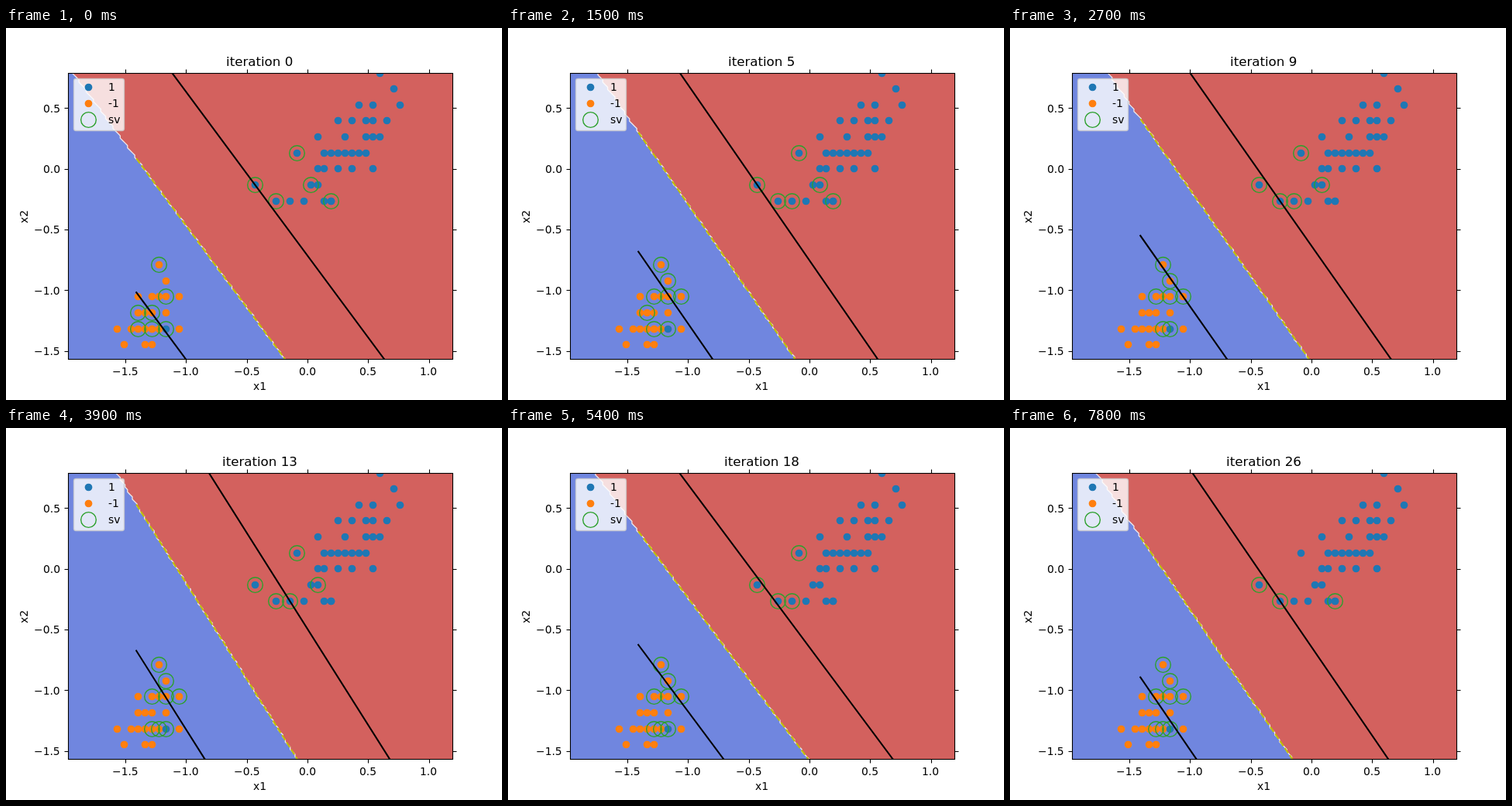
An HTML page with a canvas for the animation above (8 s loop, 640x480 px).

```html
<!DOCTYPE html>
<html lang="en">
<head>
<meta charset="utf-8">
<title>Decision boundary</title>
<style>
html, body { margin: 0; width: 100%; height: 100%; overflow: hidden; background: #fff; }
canvas { display: block; width: 640px; height: 480px; }
</style>
</head>
<body>
<canvas id="plot" width="640" height="480"></canvas>
<script>
const ctx = document.getElementById('plot').getContext('2d');
const STEP = 300, LOOP = 8000;
const L = 80, R = 576, T = 57.6, B = 427.2;
const UNIT = 156.65, CELL = UNIT * 0.02, LINE_X = 168.2;
const BLUE = '#1f77b4', ORANGE = '#ff7f0e', GREEN = '#2ca02c';

const px = v => 389.1 + v * UNIT;
const py = v => 181.7 - v * UNIT;
const snap = v => Math.round(v) + 0.5;

// Samples lie on a grid of columns and rows
const col = c => Math.floor(143.7 + 8.908 * c) + 0.5;
const row = r => Math.floor(58.05 + 20.63 * r) + 0.5;
const samples = [], vectors = [];

// Samples along one row; bend moves them towards one end
function spread(r, first, last = first, count = 1, bend = 1) {
  for (let i = 0; i < count; i++) {
    const u = count > 1 ? i / (count - 1) : 0;
    samples.push([Math.round(first + (last - first) * (1 - (1 - u) ** bend)), r]);
  }
}

// Samples that are support vectors from one iteration to another
function support(from, to, ...cells) {
  for (const cell of cells) {
    samples.push(cell);
    vectors.push({ cell, from, to });
  }
}

spread(0, 38);
spread(1, 40);
spread(2, 35, 41, 3, 0.6);
spread(3, 32, 39, 5);
spread(4, 29, 38, 5, 2);
spread(5, 30, 36, 7);
spread(6, 29, 37, 5, 0.6);
spread(8, 27, 30, 2);
spread(14, 3, 6, 2);
spread(15, 7);
spread(16, 0, 9, 4, 0.6);
spread(17, 1, 5, 3, 2);

const outlier = [7, 16];
support(0, 26, [20, 7], [23, 8], [6, 12], [7, 14], outlier);
support(0, 2, [28, 7], [3, 15], [5, 15], [3, 16]);
support(3, 26, [7, 13], [5, 14], [9, 14]);
support(0, 18, [26, 5]);
support(3, 14, [29, 7]);
support(3, 23, [25, 8]);
support(0, 6, [31, 8], [5, 16]);
support(3, 6, [4, 15]);
support(7, 26, [6, 16]);
support(11, 26, [5, 16]);
support(20, 26, [31, 8]);

// Iteration, boundary x at the bottom, its run to the top, half margin
const fits = [
  [0, 360, 274, 128], [5, 370.5, 255.5, 106.5], [9, 385.8, 259.5, 105.8],
  [13, 375.8, 233.5, 119.3], [16, 400.8, 285.5, 105.3],
  [22, 360.5, 256, 117], [26, 364.3, 253, 123.8]
];

function fitAt(n) {
  const i = Math.max(1, fits.findIndex(f => f[0] >= n));
  const a = fits[i - 1], b = fits[i];
  const u = (n - a[0]) / (b[0] - a[0]);
  return a.map((v, k) => v + (b[k] - v) * u);
}

function path(points, color, width) {
  ctx.beginPath();
  for (const [x, y] of points) ctx.lineTo(x, y);
  ctx.strokeStyle = color;
  ctx.lineWidth = width;
  ctx.stroke();
}

function dot(x, y, color) {
  ctx.beginPath();
  ctx.arc(x, y, 4.86, 0, 7);
  ctx.fillStyle = color;
  ctx.fill();
}

function ring(x, y) {
  ctx.beginPath();
  ctx.arc(x, y, 9.82, 0, 7);
  ctx.strokeStyle = GREEN;
  ctx.lineWidth = 1.39;
  ctx.stroke();
}

// Text starts on whole pixels; align is 0 for left, 0.5 for centre, 1 for right
function text(s, x, y, align = 0.5, size = 13.89) {
  ctx.font = `${size}px "DejaVu Sans", sans-serif`;
  ctx.fillStyle = '#000';
  ctx.fillText(s, Math.round(x - align * ctx.measureText(s).width), Math.round(y));
}

// Class regions on a coarse grid, which gives the boundary its steps
function regions(bottom, run) {
  const edge = [];
  for (let y = B; y > T - CELL; y -= CELL) {
    const x = bottom - run * (B - y) / (B - T);
    edge.push([L + (Math.floor((x - L) / CELL) + 0.5) * CELL, y]);
  }
  ctx.fillStyle = '#d3615e';
  ctx.fillRect(L, T, R - L, B - T);
  ctx.beginPath();
  ctx.moveTo(L, B);
  for (const [x, y] of edge) ctx.lineTo(x, y);
  ctx.lineTo(L, T - CELL);
  ctx.fillStyle = '#7086df';
  ctx.fill();
  path(edge, '#eee8ea', 1.3);
}

function model(n) {
  const [, mid, run, half] = fitAt(n);
  const from = x => [[LINE_X, B - (x - LINE_X) * (B - T) / run], [x, B]];

  regions(mid, run);
  for (const [c, r] of samples) dot(col(c), row(r), r < 9 ? BLUE : ORANGE);
  dot(col(outlier[0]), row(outlier[1]), BLUE);
  for (const { cell: [c, r], from, to } of vectors) {
    if (n >= from && n <= to) ring(col(c), row(r));
  }

  ctx.setLineDash([7.7, 3.3]);
  path(from(mid), '#bfbf00', 2.08);
  ctx.setLineDash([]);
  ctx.lineCap = 'square';
  path(from(mid + half), '#000', 2.08);
  path(from(mid - half), '#000', 2.08);
  ctx.lineCap = 'butt';
}

function axes() {
  const tick = (x, y, dx, dy) => path([[x, y], [x + dx, y + dy]], '#000', 1.1);
  const label = v => v.toFixed(1).replace('-', '\u2212');
  for (let v = -1.5; v <= 1; v += 0.5) {
    const x = snap(px(v));
    tick(x, 58, 0, -4.5);
    tick(x, 428, 0, 4.5);
    text(label(v), px(v) - 0.4, 448);
  }
  for (let v = -1.5; v <= 0.5; v += 0.5) {
    const y = snap(py(v));
    tick(80, y, -4.5, 0);
    tick(577, y, 4.5, 0);
    text(label(v), 70, py(v) + 5.2, 1);
  }
  ctx.strokeStyle = '#000';
  ctx.lineWidth = 1.1;
  ctx.strokeRect(80.5, 58.5, 496, 369);
  text('x1', 328, 467);
  ctx.save();
  ctx.translate(28, 243);
  ctx.rotate(-Math.PI / 2);
  text('x2', 0, 0);
  ctx.restore();
}

function legend() {
  ctx.beginPath();
  ctx.roundRect(87.5, 65.5, 65, 67, 2.8);
  ctx.fillStyle = 'rgba(255,255,255,.8)';
  ctx.fill();
  ctx.strokeStyle = 'rgba(204,204,204,.8)';
  ctx.lineWidth = 1.39;
  ctx.stroke();
  dot(106.5, 76.5, BLUE);
  dot(106.5, 97.5, ORANGE);
  ring(106.5, 118.5);
  ['1', '-1', 'sv'].forEach((s, i) => text(s, 132, 81 + i * 21, 0));
}

function draw(now) {
  const n = Math.floor((now % LOOP) / STEP);
  ctx.fillStyle = '#fff';
  ctx.fillRect(0, 0, 640, 480);
  ctx.save();
  ctx.beginPath();
  ctx.rect(L, 58, 496.5, 369.5);
  ctx.clip();
  model(n);
  ctx.restore();
  axes();
  legend();
  text('iteration ' + n, 327.5, 49, 0.5, 16.67);
}

const start = performance.now();
function loop() {
  draw(performance.now() - start);
  requestAnimationFrame(loop);
}
loop();
</script>
</body>
</html>
```
